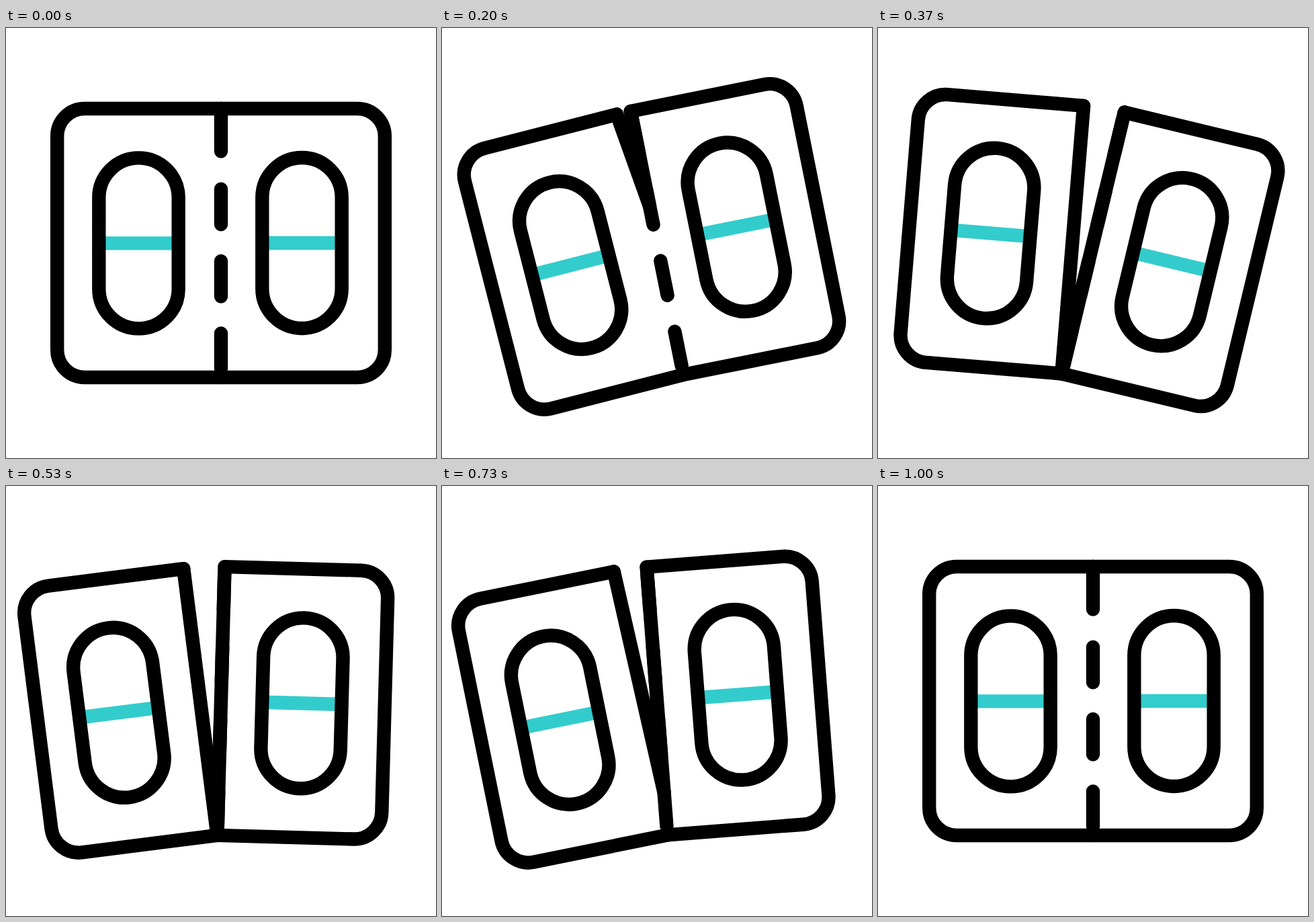
Animation, 640 px wide and 640 px high, one loop 1.67 s. Source, as an HTML page:

```html
<!DOCTYPE html>
<html lang="en">
<head>
<meta charset="utf-8">
<title>Tearing pill pack</title>
<style>
  html, body { margin: 0; width: 100%; height: 100%; overflow: hidden; background: #fff; }
  svg { display: block; width: 100%; height: 100%; }
  #pack { fill: none; stroke: #000; stroke-width: 20.4; stroke-linecap: round; stroke-linejoin: round; }
  .band { stroke: #3cc; stroke-linecap: butt; }
</style>
</head>
<body>
<svg viewBox="0 0 640 640">
  <defs>
    <g id="pill">
      <path class="band" d="M-59 0H59"/>
      <rect x="-59.2" y="-127" width="118.4" height="254" rx="59.2"/>
    </g>
  </defs>
  <g id="pack">
    <g id="left">
      <path d="M320 120H117a40.8 40.8 0 0 0-40.8 40.8V479.2a40.8 40.8 0 0 0 40.8 40.8H320"/>
      <use href="#pill" x="197.5" y="320.4"/>
    </g>
    <path d="M320 120H523a40.8 40.8 0 0 1 40.8 40.8V479.2a40.8 40.8 0 0 1-40.8 40.8H320"/>
    <use href="#pill" x="440.5" y="320"/>
    <path d="M320 131v52.6M320 239.8v52.5M320 347v52.5M320 454.4v52"/>
    <path id="tear"/>
  </g>
</svg>
<script>
  const LOOP = 1670, LAST = 30, MAX_OPEN = 8.8;
  const TOP = 120, HINGE = 520, HEIGHT = HINGE - TOP;

  // [step, value] pairs, eased between neighbours
  const swing = [[0, 0], [5.1, -13], [11, 13.5], [19.8, -6.3], [25.9, 0]];
  const opening = [[2.75, 0], [11, 1], [18.8, 1], [30, 0]];

  const [pack, left, tear] = ['pack', 'left', 'tear'].map(id => document.getElementById(id));

  function valueAt(keys, step) {
    if (step <= keys[0][0]) return keys[0][1];
    for (let i = 1; i < keys.length; i++) {
      const [s0, v0] = keys[i - 1], [s1, v1] = keys[i];
      if (step <= s1) {
        const u = (step - s0) / (s1 - s0);
        return v0 + (v1 - v0) * u * u * (3 - 2 * u);
      }
    }
    return keys[keys.length - 1][1];
  }

  // 30 steps per second, with start times rounded to 10 ms
  function stepAt(ms) {
    let step = Math.min(LAST, Math.ceil(ms * 0.03) + 1);
    while (step > 0 && Math.round(step * 10 / 3) * 10 > ms) step--;
    return step;
  }

  function draw(step) {
    const open = valueAt(opening, step);
    const angle = -MAX_OPEN * open;
    const rad = angle * Math.PI / 180;
    const tip = TOP + HEIGHT * Math.min(1, open * 1.05);
    const x = 320 + HEIGHT * Math.sin(rad);
    const y = HINGE - HEIGHT * Math.cos(rad);
    pack.setAttribute('transform', `rotate(${valueAt(swing, step)} 320 320)`);
    left.setAttribute('transform', `rotate(${angle} 320 ${HINGE})`);
    tear.setAttribute('d', `M${x} ${y}L320 ${tip}V${TOP}`);
  }

  const start = performance.now();
  function tick() {
    draw(stepAt((performance.now() - start) % LOOP));
    requestAnimationFrame(tick);
  }
  tick();
</script>
</body>
</html>
```
